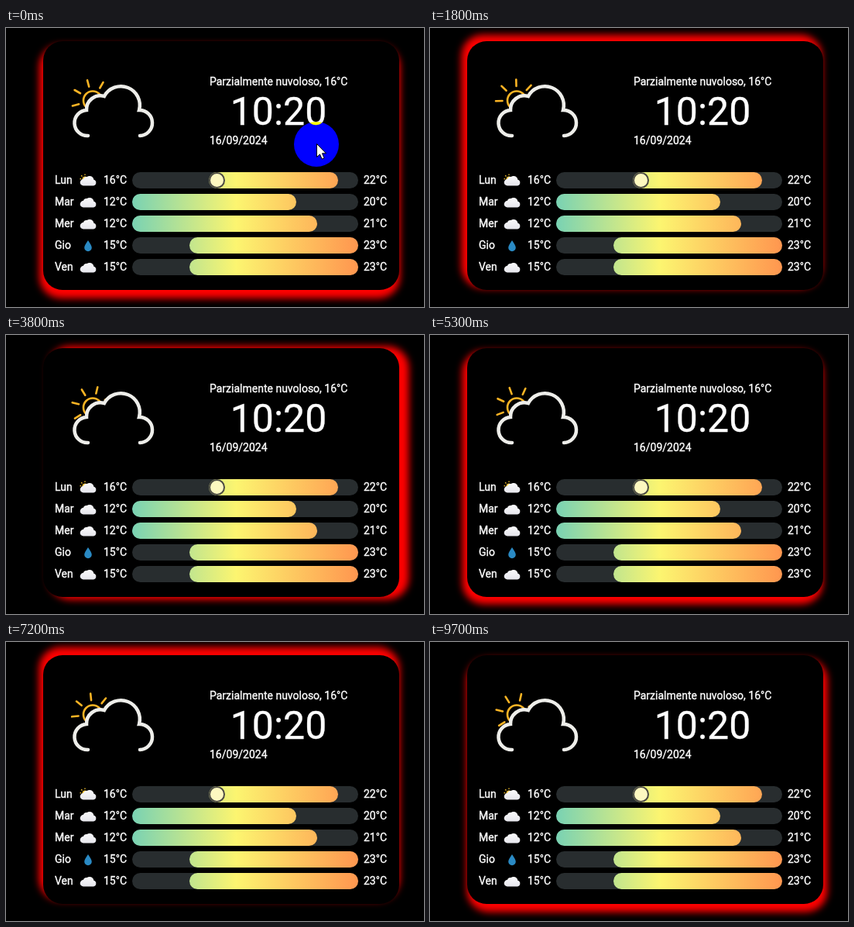
Recreate the animation shown at these times as an HTML page. Size 540 by 360 pixels, loop 9800 ms.

```html
<!DOCTYPE html>
<html lang="it">
<head>
<meta charset="utf-8">
<style>
  html, body { margin: 0; width: 540px; height: 360px; overflow: hidden; background: #000; }
  #card { position: absolute; left: 48px; top: 17px; width: 460px; height: 321px; border-radius: 25px; background: #000; }
  svg { position: absolute; left: 0; top: 0; }
  text { font: 14px Roboto, sans-serif; fill: #fff; stroke: #fff; stroke-width: .35px; }
  #clock { font-size: 50px; text-anchor: middle; }
  #spot { mix-blend-mode: difference; }
</style>
</head>
<body>
<div id="card"></div>
<svg width="540" height="360" viewBox="0 0 540 360">
  <defs>
    <linearGradient id="heat" gradientUnits="userSpaceOnUse" x1="163" x2="455" y1="0" y2="0">
      <stop stop-color="#79d2b3"/>
      <stop offset=".46" stop-color="#fcf570"/>
      <stop offset="1" stop-color="#ff964f"/>
    </linearGradient>
    <linearGradient id="grey" x2="0" y2="1">
      <stop stop-color="#fafafc"/>
      <stop offset="1" stop-color="#e6e6ec"/>
    </linearGradient>
    <path id="cloud" d="M-6 6.500a4.200 4.200 0 0 1-.2-8.400 4.400 4.400 0 0 1 4.600-3 5.600 5.600 0 0 1 9 3.600 4 4 0 0 1-.4 7.800z" fill="url(#grey)"/>
    <path id="drop" d="M0-7C2.500-3 4.800 0 4.800 2.400a4.800 4.800 0 0 1-9.600 0C-4.800 0-2.500-3 0-7z" fill="#2a8ac4"/>
    <g id="partly">
      <path d="M-9-2.500l-1.500.3M-7.500-5.500l-1.300-1.300M-4-7v-1.500" stroke="#f0c030" stroke-width="1.300"/>
      <circle cx="-4" cy="-2" r="3.500" fill="#f0c030"/>
      <use href="#cloud"/>
    </g>
  </defs>

  <g fill="none" stroke="#fbb424" stroke-width="2.600" stroke-linecap="round">
    <circle cx="112" cy="93.500" r="12"/>
    <g id="rays"></g>
  </g>
  <path d="M106 139A16 16 0 0 1 104 106A18 18 0 0 1 127 88A24.400 24.400 0 0 1 172 106A16 16 0 0 1 173 139"
        fill="#000" stroke="#eeeeea" stroke-width="4.500" stroke-linecap="round"/>

  <text x="263" y="74">Parzialmente nuvoloso, 16°C</text>
  <text x="352" y="125" id="clock">10:20</text>
  <text x="263" y="150">16/09/2024</text>
  <g id="days"></g>
  <circle cx="272.500" cy="196.500" r="9.500" fill="#fdf8c0" stroke="#4c4a44" stroke-width="2"/>

  <circle id="spot" cx="401" cy="150" r="29" fill="#00f"/>
  <path id="arrow" d="M401.500 149.500v17l4-3.600 2.600 6.200 3-1.300-2.600-6h5z" fill="#fff" stroke="#000"/>
</svg>
<script>
const LOOP = 9800, ORBIT = 5.1, POINTER_END = 1.7;
const $ = id => document.getElementById(id);

// day, icon, low, high, bar start, bar end
const days = [
  ['Lun', 'partly', 16, 22, 262, 429],
  ['Mar', 'cloud', 12, 20, 163, 375],
  ['Mer', 'cloud', 12, 21, 163, 402],
  ['Gio', 'drop', 15, 23, 237, 455],
  ['Ven', 'cloud', 15, 23, 237, 455]
];
const bar = (x1, x2, y, fill) =>
  `<rect x="${x1}" y="${y - 10.5}" width="${x2 - x1}" height="21" rx="10.5" fill="${fill}"/>`;

$('days').innerHTML = days.map(([name, icon, low, high, x1, x2], i) => {
  const y = 196.5 + 28 * i;
  return `<text x="63" y="${y + 4.5}">${name}</text>
    <use href="#${icon}" x="106" y="${y + .5}"/>
    <text x="126" y="${y + 4.5}">${low}°C</text>
    ${bar(163, 455, y, '#282d2f')}${bar(x1, x2, y, 'url(#heat)')}
    <text x="462" y="${y + 4.5}">${high}°C</text>`;
}).join('');

$('rays').innerHTML = Array.from({ length: 8 }, (_, i) =>
  `<path d="M18.500 0h8.500" transform="rotate(${45 * i})"/>`).join('');

// shadow offset: seconds, x, y
const path = [
  [0, -2, 8], [1.05, -10, 0], [2.1, -2.5, -7.5], [2.5, 0, 0],
  [3.75, 10, 0], [4.9, 0, 10], [ORBIT, -2, 8]
];

function shadowAt(s) {
  const i = path.findIndex(p => p[0] > s);
  const [a, b] = [path[i - 1], path[i]];
  const k = (s - a[0]) / (b[0] - a[0]);
  return [1, 2].map(n => a[n] + (b[n] - a[n]) * k);
}

function draw(now) {
  const t = Math.floor(now % LOOP / 100) / 10;
  const [x, y] = shadowAt(t % ORBIT);
  $('card').style.boxShadow = `${x}px ${y}px 10px 3px red`;
  $('rays').setAttribute('transform', `translate(112 93.5) rotate(${7.5 * t - 105})`);
  const pointer = t < POINTER_END ? 'visible' : 'hidden';
  $('spot').style.visibility = $('arrow').style.visibility = pointer;
  requestAnimationFrame(draw);
}
draw(performance.now());
</script>
</body>
</html>
```
